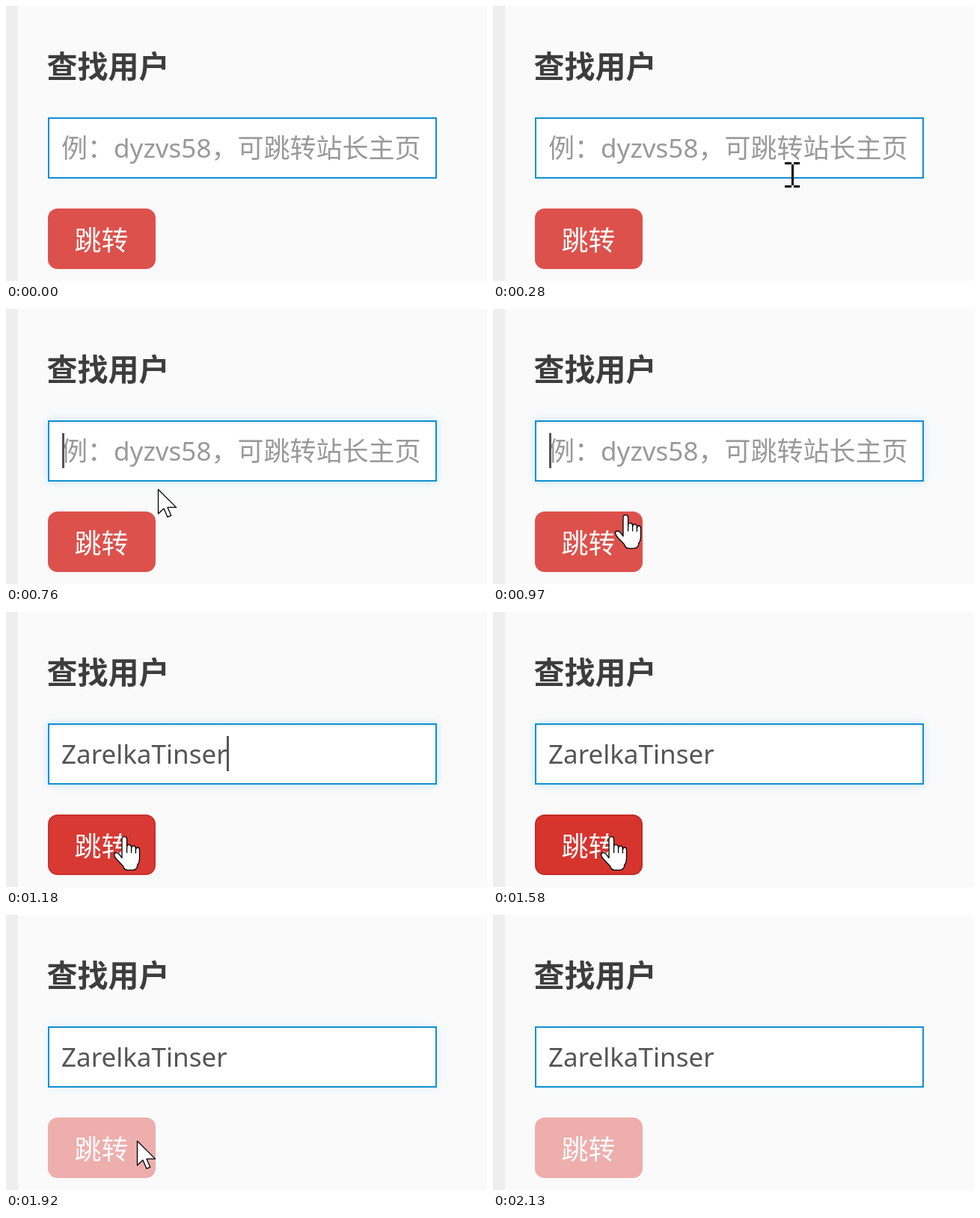
An HTML page with a canvas that plays this animation: 643x368 px, repeating every 2400 ms.

```html
<!DOCTYPE html>
<html lang="zh-CN">
<head>
<meta charset="utf-8">
<title>查找用户</title>
<style>
html, body { margin: 0; width: 100%; height: 100%; overflow: hidden; background: #fafafa; }
canvas { display: block; }
</style>
</head>
<body>
<canvas id="stage" width="643" height="368"></canvas>
<script>
const ctx = document.getElementById('stage').getContext('2d');
const LOOP = 2400, TICK = 68.6;
const FAMILY = '"Noto Sans", "Noto Sans CJK SC", "Noto Sans CJK", sans-serif';
const HINT = '例：dyzvs58，可跳转站长主页';
const NAME = 'ZarelkaTinser';

// Ticks at which the state changes
const FOCUS = 7, PASTE = 15, HOVER = 14, BLINK = 23, PRESS = 26, RELEASE = 27;

const PAGE = [250, 250, 250], WHITE = [255, 255, 255];
const RED = [221, 81, 76], DARK = [215, 52, 46], EDGE = [198, 43, 38];

// Pointer path: tick, x, y
const PATH = [
  [1, 552, 345], [3, 460, 265], [4, 400, 226], [6, 337, 202], [8, 337, 202],
  [11, 203, 241], [14, 177, 275], [17, 158, 300], [27, 158, 300],
  [28, 175, 302], [30, 376, 327], [31, 560, 400]
];

const clamp = v => Math.max(0, Math.min(1, v));
const ramp = (v, a, b) => clamp((v - a) / (b - a));
const mix = (a, b, k) => `rgb(${a.map((v, i) => Math.round(v + (b[i] - v) * k))})`;

function pointerAt(n) {
  for (let i = 1; i < PATH.length; i++) {
    const [a, ax, ay] = PATH[i - 1], [b, bx, by] = PATH[i];
    if (n >= a && n <= b) {
      const k = (n - a) / (b - a);
      return { x: ax + (bx - ax) * k, y: ay + (by - ay) * k };
    }
  }
  return null;
}

function text(str, x, y, size, color, weight = 400) {
  ctx.font = `${weight} ${size}px ${FAMILY}`;
  ctx.fillStyle = color;
  ctx.fillText(str, x, y);
}

function box(x, y, w, h, r, fill, stroke, line = 1) {
  ctx.beginPath();
  ctx.roundRect(x, y, w, h, r);
  ctx.fillStyle = fill;
  ctx.fill();
  if (stroke) {
    ctx.strokeStyle = stroke;
    ctx.lineWidth = line;
    ctx.stroke();
  }
}

function drawInput(n) {
  const glow = n < PRESS ? ramp(n, FOCUS, FOCUS + 4) : 1 - ramp(n, PRESS, PRESS + 4);
  ctx.save();
  ctx.shadowBlur = 11;
  ctx.shadowColor = `rgba(59,180,242,${0.3 * glow})`;
  box(56, 149, 520, 82, 0, '#0e90d2');
  ctx.restore();
  box(58, 151, 516, 78, 0, '#fff');
  const inset = ctx.createLinearGradient(0, 151, 0, 155);
  inset.addColorStop(0, `rgba(0,0,0,${0.075 * glow})`);
  inset.addColorStop(1, 'rgba(0,0,0,0)');
  box(58, 151, 516, 4, 0, inset);

  const filled = n >= PASTE;
  text(filled ? NAME : HINT, 74, 203, 35, filled ? '#555' : '#999');
  if (n >= FOCUS && n < BLINK) {
    ctx.fillStyle = '#555';
    ctx.fillRect(filled ? 295 : 75, 166, 3, 47);
  }
}

function drawButton(n) {
  const off = n >= RELEASE;
  const k = 1 - (1 - ramp(n, HOVER, HOVER + 5)) ** 2;
  const fill = off ? mix(PAGE, RED, 0.45) : mix(RED, DARK, k);
  const edge = off ? fill : mix(RED, EDGE, k);
  if (n === PRESS) {
    box(56.75, 271.75, 142.5, 79.5, 12.5, '#fff', edge, 1.5);
    box(63, 278, 130, 67, 5, fill, '#101010', 4.5);
  } else {
    box(57, 272, 142, 79, 12, fill, edge, 2);
  }
  text('跳转', 91.5, 326.5, 36, off ? mix(PAGE, WHITE, 0.45) : '#fff');
}

function outline(shape) {
  ctx.fillStyle = '#fff';
  ctx.strokeStyle = '#000';
  ctx.lineWidth = 1.3;
  ctx.lineJoin = 'round';
  ctx.fill(shape);
  ctx.stroke(shape);
}

function arrow() {
  outline(new Path2D('M.5 .5V33L8 26L13 37.4L17.8 35.4L13 24.4H24.5Z'));
}

function beam() {
  ctx.fillStyle = '#000';
  ctx.fillRect(-1, -14, 3, 28);
  for (const y of [-17, 14]) {
    ctx.fillRect(-10, y, 9, 3);
    ctx.fillRect(2, y, 8, 3);
  }
}

function hand() {
  ctx.translate(-14, 0);
  outline(new Path2D('M11 29V4Q11 .6 14.3 .6T17.6 4V14Q18 11.4 20.6 11.4T23.6 14.5V16' +
    'Q24 12.8 26.4 12.8T29.4 16V18Q30 15 32.2 15T34.5 18.5V30Q34.5 35 31.5 39V41' +
    'Q30 45.4 24 45.4H19Q14 45.4 12.5 40L4 31Q.6 27 .6 24.5T3.5 22Q6 22 8 25Z'));
  ctx.stroke(new Path2D('M17.6 14V22.5M23.6 15V22.5M29.4 17V23'));
}

function drawPointer(n) {
  const p = pointerAt(n);
  if (!p) return;
  const inX = (a, b) => p.x >= a && p.x < b;
  const overInput = inX(56, 576) && p.y >= 149 && p.y < 231;
  const overButton = inX(56, 200) && p.y >= 271 && p.y < 352;
  ctx.save();
  ctx.translate(Math.round(p.x), Math.round(p.y));
  if (overInput) beam();
  else if (overButton && n < RELEASE) hand();
  else arrow();
  ctx.restore();
}

function drawClick(x, y) {
  ctx.fillStyle = 'rgba(255,255,0,.5)';
  ctx.beginPath();
  ctx.arc(x, y, 30, 0, Math.PI * 2);
  ctx.fill();
}

function draw(now) {
  const n = Math.floor((now % LOOP + 5) / TICK);
  ctx.fillStyle = '#fafafa';
  ctx.fillRect(0, 0, 643, 368);
  ctx.fillStyle = '#eee';
  ctx.fillRect(0, 0, 16, 368);
  text('查找用户', 54.5, 96, 41, '#3d3d3d', 700);
  drawInput(n);
  drawButton(n);
  drawPointer(n);
  if (n === FOCUS) drawClick(333, 200);
  if (n === PRESS) drawClick(157, 300);
}

let start;
function frame(now) {
  if (start === undefined) start = now;
  draw(now - start);
  requestAnimationFrame(frame);
}
requestAnimationFrame(frame);
</script>
</body>
</html>
```
